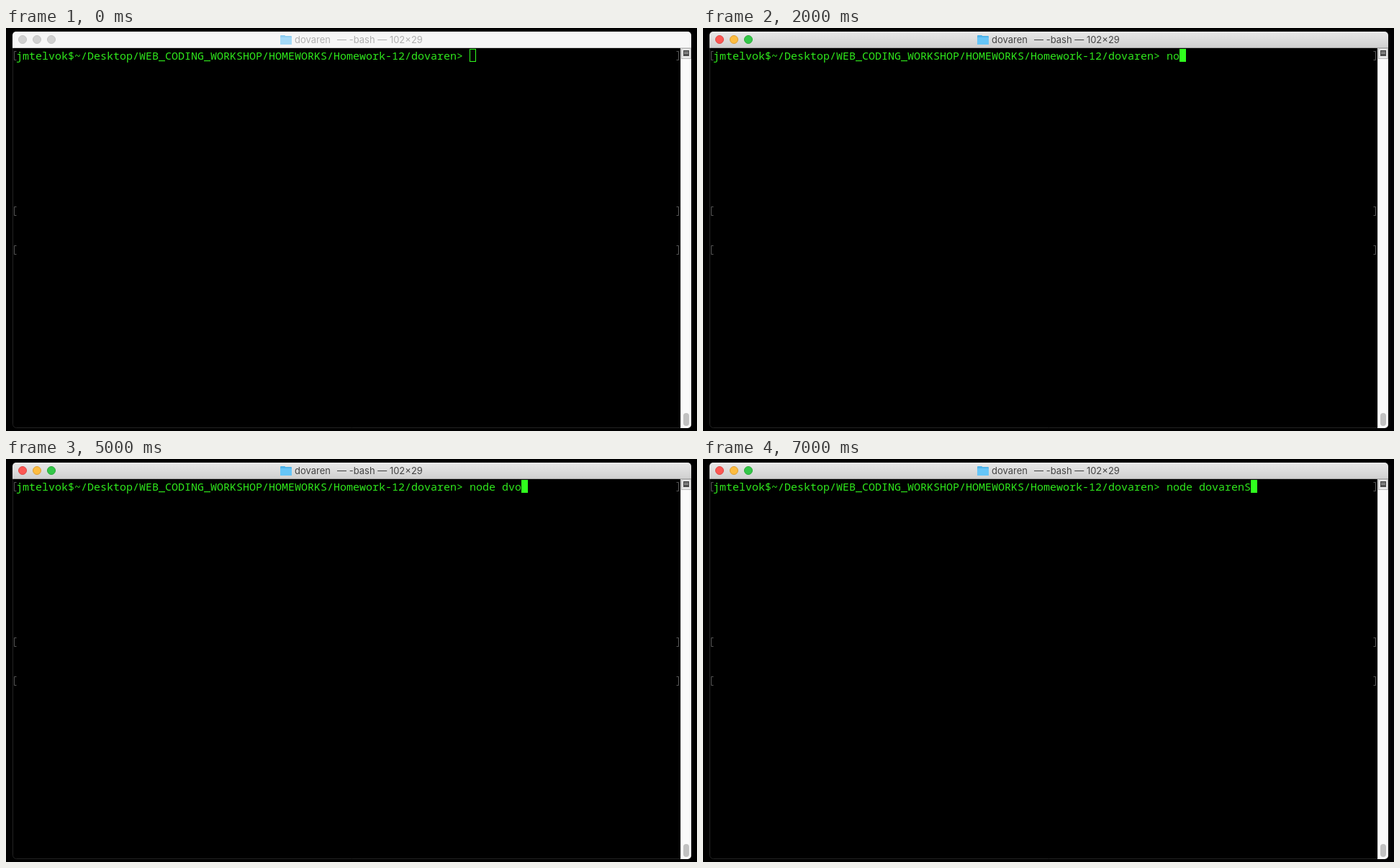
An HTML page with a canvas for the animation above (8000 ms loop, 960 px wide and 560 px high).

```html
<!DOCTYPE html>
<html lang="en">
<head>
<meta charset="utf-8">
<title>Terminal</title>
<style>
html, body { margin: 0; width: 960px; height: 560px; overflow: hidden; background: #000; }
canvas { display: block; }
</style>
</head>
<body>
<canvas id="stage" width="960" height="560"></canvas>
<script>
const ctx = document.getElementById('stage').getContext('2d');
const LOOP = 8000, CELL = 9, LEFT = 14;
const PROJECT = 'dovaren';
const PROMPT = `jmtelvok$~/Desktop/WEB_CODING_WORKSHOP/HOMEWORKS/Homework-12/${PROJECT}> `;
// One entry per second: what has been typed so far.
const TYPED = ['', '', 'no', 'node ', 'node ', 'node dvo', `node ${PROJECT}`, `node ${PROJECT}S`];
const MONO = '300 15px "Noto Sans Mono", "Liberation Mono", monospace';
const SANS = '13px Inter, Roboto, sans-serif';

function rect(x, y, w, h, color) {
  ctx.fillStyle = color;
  ctx.fillRect(x, y, w, h);
}

function round(x, y, w, h, radii, fill) {
  ctx.beginPath();
  ctx.roundRect(x, y, w, h, radii);
  ctx.fillStyle = fill;
  ctx.fill();
}

function frame(x, y, w, h, color) {
  ctx.strokeStyle = color;
  ctx.lineWidth = 1;
  ctx.strokeRect(x + 0.5, y + 0.5, w - 1, h - 1);
}

function text(str, x, y, font, color) {
  ctx.font = font;
  ctx.fillStyle = color;
  ctx.fillText(str, x, y);
}

function light(x, fill, edge) {
  ctx.beginPath();
  ctx.arc(x, 16, 5.5, 0, Math.PI * 2);
  ctx.fillStyle = fill;
  ctx.fill();
  ctx.strokeStyle = edge;
  ctx.lineWidth = 1;
  ctx.stroke();
}

function folder(active) {
  const back = active ? '#4fb4ea' : '#8fcdf0';
  const front = active ? '#66c5f7' : '#a3d9f7';
  round(381, 10, 7, 4, 1, back);
  round(381, 11, 16, 12, 1, back);
  round(381, 13, 16, 10, 1, front);
}

function titleBar(active) {
  let fill = '#f6f6f6';
  if (active) {
    fill = ctx.createLinearGradient(0, 5, 0, 27);
    fill.addColorStop(0, '#e9e9e9');
    fill.addColorStop(1, '#d0d0d0');
  }
  round(9, 5, 943, 22, [5, 5, 0, 0], fill);
  rect(9, 27, 943, 1, active ? '#a8a8a8' : '#d0d0d0');
  const lights = active
    ? [['#fc5753', '#df4744'], ['#fdbc40', '#de9f34'], ['#33c748', '#27aa35']]
    : Array(3).fill(['#d0d0d0', '#c4c4c4']);
  lights.forEach(([fill, edge], i) => light(23 + i * 20, fill, edge));
  folder(active);
  const color = active ? '#444' : '#b0b0b0';
  text(PROJECT, 401, 21, SANS, color);
  text('— -bash — 102×29', 460, 21, SANS, color);
}

function scrollBar() {
  round(937, 28, 15, 528, [0, 0, 5, 0], '#fafafa');
  rect(937, 28, 1, 527, '#e4e4e4');
  rect(938, 28, 14, 15, '#e8e8e8');
  frame(938, 28, 14, 15, '#b8b8b8');
  rect(941, 31, 8, 8, '#4a4a4a');
  rect(942, 33, 6, 1, '#aaa');
  rect(942, 35, 6, 1, '#aaa');
  round(941, 535, 8, 18, 4, '#c1c1c1');
}

function bracket(x, y, dir) {
  ctx.beginPath();
  ctx.moveTo(x + 3 * dir, y + 0.5);
  ctx.lineTo(x, y + 0.5);
  ctx.lineTo(x, y + 12.5);
  ctx.lineTo(x + 3 * dir, y + 12.5);
  ctx.strokeStyle = '#555';
  ctx.lineWidth = 1;
  ctx.stroke();
}

function draw(now) {
  const second = Math.floor((now % LOOP) / 1000);
  const active = second > 0;
  const line = PROMPT + TYPED[second];

  rect(0, 0, 960, 560, '#000');
  ctx.beginPath();
  ctx.roundRect(9.5, 20.5, 942, 535, 5);
  ctx.strokeStyle = '#222';
  ctx.lineWidth = 1;
  ctx.stroke();
  titleBar(active);
  scrollBar();

  for (const row of [0, 12, 15]) {
    bracket(11.5, 32 + row * 18, 1);
    bracket(934.5, 32 + row * 18, -1);
  }

  text(line, LEFT, 44, MONO, '#2fe81c');
  const cursorX = LEFT + line.length * CELL;
  if (active) rect(cursorX, 29, CELL, 18, '#30ff1e');
  else frame(cursorX, 29, CELL, 18, '#30ff1e');
}

function tick() {
  draw(performance.now());
  requestAnimationFrame(tick);
}
tick();
</script>
</body>
</html>
```
